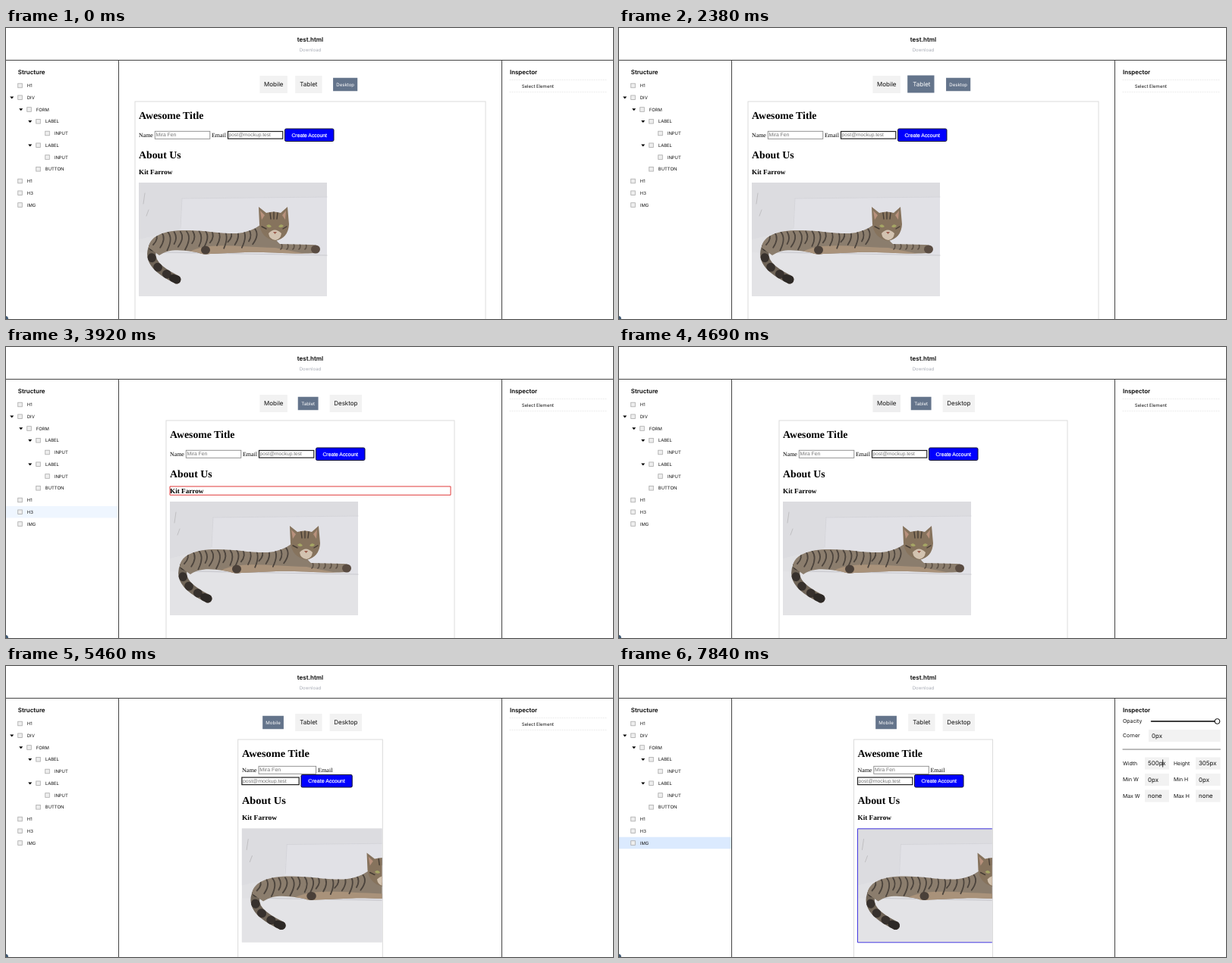
An HTML page that plays this animation: 800x384 px, repeating every 8000 ms.

```html
<!DOCTYPE html>
<html lang="en">
<head>
<meta charset="utf-8">
<title>Page editor</title>
<style>
  html, body { margin: 0; width: 100%; height: 100%; overflow: hidden; background: #fff; }
  svg { display: block; }
  text { font-family: Inter, sans-serif; text-rendering: geometricPrecision; white-space: pre; }
  .serif { font-family: "Liberation Serif", serif; }
  .arial { font-family: "Liberation Sans", sans-serif; }
  .bold { font-weight: 700; }
  .semi { font-weight: 600; }
  .mid { text-anchor: middle; }
  .strong { stroke: #fff; stroke-width: .2; }
</style>
</head>
<body>
<svg id="stage" width="800" height="384" viewBox="0 0 800 384"></svg>
<script>
const LOOP = 8000;
const WIDTHS = { desktop: 463, tablet: 381, mobile: 184 };
const TABLET_CLICK = 2675, MOBILE_CLICK = 5134, TAB_DELAY = 50, SELECT = 6510, UNHOVER = 7350, CARET = 7840;

const TREE = [['H1', 0], ['DIV', 0, 1], ['FORM', 1, 1], ['LABEL', 2, 1], ['INPUT', 3], ['LABEL', 2, 1],
  ['INPUT', 3], ['BUTTON', 2], ['H1', 0], ['H3', 0], ['IMG', 0]];
const IMG = 10;
// Hovered tree row from each time on; -1 means none
const HOVERS = [[0, -1], [3500, 7], [3640, IMG], [3920, 9], [4060, 8], [4130, 7], [4200, 5], [4270, 6],
  [4340, -1], [6300, 9], [6370, IMG], [UNHOVER, -1]];
// Outline boxes inside the page: x, y, width (0 = full), height
const BOXES = { 5: [101.5, 136, 94, 10.5], 6: [122.5, 136, 73, 10.5], 7: [197.5, 132.5, 65, 17.5],
  8: [5.5, 158, 0, 18], 9: [5.5, 184, 0, 11.3], 10: [5.5, 204.3, 248, 150] };

const text = (x, y, s, size, cls = '', fill = '#111') =>
  `<text x="${x}" y="${y + size * .35}" font-size="${size}" class="${cls}" fill="${fill}">${s}</text>`;
const rect = (x, y, w, h, fill, extra = '') =>
  `<rect x="${x}" y="${y}" width="${w}" height="${h}" fill="${fill}" ${extra}/>`;
const path = (d, fill, extra = '') => `<path d="${d}" fill="${fill}" ${extra}/>`;
const line = (d, color, w = 1, extra = '') =>
  path(d, 'none', `stroke="${color}" stroke-width="${w}" stroke-linecap="round" ${extra}`);
const rowY = i => 76 + 15.75 * i;

function treeRow([name, level, open], i) {
  const x = 18.5 + 12 * level, y = rowY(i);
  return rect(x - 2.8, y - 2.8, 5.6, 5.6, '#eee', 'stroke="#aaa" stroke-width=".8"') +
    text(x + 9.3, y, name, 5.9) +
    (open ? path(`M${x - 13.3} ${y - 1.2}h5l-2.5 3z`, '#000') : '');
}

function catPhoto() {
  const body = 'M13 86C14 72 30 64 56 63C85 62 105 68 130 67Q148 65 160 56C172 62 180 76 186 81L228 82' +
    'C239 81 241 92 232 93C205 95 165 91 140 92L94 94C82 96 82 92 70 91C52 88 38 88 27 96Z';
  let stripes = '';
  for (let i = 0; i < 17; i++) {
    const x = 22 + i * 8.2;
    stripes += line(`M${x} ${66 - i * .3}q${5 + i % 3} 8 ${-3 + i % 4} ${16 + i % 3 * 4}`, '#4c443d', 1.8);
  }
  for (let i = 0; i < 5; i++) stripes += line(`M${188 + i * 8} 80q2 6 -1 8`, '#5b4f44', 1.6);
  const tail = 'M19 84C10 104 28 117 50 128';
  return rect(0, 0, 248, 150, '#e0e0e3') +
    path('M0 0H248V19L57 21L54 62L0 75Z', '#dcdce0') +
    path('M57 21L248 19V96L110 93L54 62Z', '#e1e1e6') +
    path('M0 92L248 95V150H0Z', '#e3e3e6') +
    line('M57 21L248 19M57 21L55 60', '#d2d2d7', .8) +
    line('M30 92L248 96', '#c9c9cf', 1.2) +
    line('M8 14l-2 14M13 36l-3 8', '#c0bfc2') +
    line(tail, '#6f6457', 11) + line(tail, '#37312d', 11, 'stroke-dasharray="1 14" stroke-linecap="butt"') +
    line('M45 126l5 2', '#2d2926', 10) +
    path(body, '#8b7d6d') +
    `<clipPath id="fur"><path d="${body}"/></clipPath><g clip-path="url(#fur)">` +
    path('M62 94C85 78 120 84 180 86L240 98H62Z', '#a9927a') + stripes + '</g>' +
    path('M158 32L168 40Q178 37 187 40L196 32L198 55Q197 73 180 77Q161 73 159 55Z', '#86735d') +
    path('M160 37l6 6l-4 6zM194 37l-5 6l4 6z', '#b8917c') +
    line('M173 40l1 8M178 39v9M183 40l-1 8M162 58l6 3M195 58l-5 3', '#463d34', 1.4) +
    path('M171 67Q179 58 188 67Q187 75 180 76Q172 75 171 67Z', '#d3c3b0') +
    path('M168 57q4-4 7 1q-4 3-7-1zM191 57q-4-4-7 1q4 3 7-1z', '#a5a565') +
    path('M177 65h5l-2.5 3z', '#9b5c4c') +
    '<ellipse cx="88" cy="89" rx="6" ry="5.5" fill="#4a4039"/><ellipse cx="233" cy="88" rx="6" ry="5.5" fill="#5a4c42"/>';
}

const page = `<clipPath id="view">${rect(0, 97, 0, 300, '#000', 'id="viewRect"')}</clipPath>
  ${rect(.5, 97, 0, 300, '#fff', 'id="frame" stroke="#dcdcdc"')}
  <g clip-path="url(#view)">
    ${text(5.5, 115, 'Awesome Title', 13.8, 'serif bold', '#000')}
    <g id="lineOne">${text(5.5, 141, 'Name', 7.9, 'serif', '#000')}
      ${rect(26.8, 136.3, 72.5, 10, '#fff', 'stroke="#888" stroke-width=".9"')}
      ${text(28, 141, 'Mira Fen', 6.8, 'arial', '#757575')}
      ${text(101.5, 141, 'Email', 7.9, 'serif', '#000')}</g>
    <g id="lineTwo">${rect(123, 136.5, 72.3, 9.6, '#fff', 'stroke="#222" stroke-width="1.2"')}
      ${text(124, 141, 'post@mockup.test', 6.7, 'arial', '#757575')}
      ${rect(198, 133, 64.5, 16.5, '#00f', 'rx="1.8" stroke="#113"')}
      ${text(230.2, 141.2, 'Create Account', 6.8, 'arial mid strong', '#fff')}</g>
    <g id="below">${text(5.5, 167, 'About Us', 13.8, 'serif bold', '#000')}
      ${text(5.5, 189.5, 'Kit Farrow', 9.2, 'serif bold', '#000')}
      <g transform="translate(5.5 204)">${catPhoto()}</g></g>
    ${rect(0, 0, 0, 0, 'none', 'id="outline" vector-effect="non-scaling-stroke"')}
  </g>`;

const tabs = [['Mobile', 334.5, 36.5], ['Tablet', 381.2, 35.3], ['Desktop', 426.7, 42.3]].map(([name, x, w]) =>
  `<g class="tab">${rect(x, 63, w, 23, '#f2f2f2')}${text(x + w / 2, 74.5, name, 8, 'mid')}</g>`).join('');

const field = (label, value, labelX, x, w, y) =>
  text(labelX, y, label, 6.9) + rect(x, y - 8, w, 16, '#f2f2f2') + text(x + 4, y, value, 7.9);
const inspector = text(664, 73, 'Opacity', 6.9) + line('M701.5 73H788', '#000', 1.5) +
  '<circle cx="788.5" cy="73" r="3.4" fill="#fff" stroke="#000"/>' +
  field('Corner', '0px', 664, 698, 94.5, 92) + line('M664 110H792.5', '#555', .8) +
  [['Width', '500px', 'Height', '305px'], ['Min W', '0px', 'Min H', '0px'], ['Max W', 'none', 'Max H', 'none']]
    .map(([a, b, c, d], i) => field(a, b, 664, 693, 32, 128.5 + i * 21.5) +
      field(c, d, 731, 760, 32.5, 128.5 + i * 21.5)).join('') +
  rect(716.3, 123.5, .8, 10, '#000', 'id="caret"');

const $ = id => document.getElementById(id);
$('stage').innerHTML = rect(0, 0, 800, 384, '#fff') + rect(0, 0, 148, 15.5, '#eff6ff', 'id="rowBg"') +
  text(401, 15, 'test.html', 8, 'mid semi', '#000') + text(401, 28.5, 'Download', 6, 'mid', '#a8abb5') +
  line('M0 42.5H800M148.5 42.5V384M653.5 42.5V384', '#444') +
  text(15.8, 58.5, 'Structure', 7.9, 'semi', '#000') + text(664, 58.5, 'Inspector', 7.9, 'semi', '#000') +
  TREE.map(treeRow).join('') + tabs + `<g id="page">${page}</g>` +
  `<g id="empty">${line('M664 68.5H793M664 84.5H793', '#e6e6e6', .8, 'stroke-dasharray="1 2"')}
    ${text(679.7, 76.5, 'Select Element', 6)}</g><g id="inspector">${inspector}</g>` +
  '<circle cx="-1" cy="384" r="4" fill="#3f5a75"/>';

const clamp = v => Math.min(1, Math.max(0, v));
const ramp = (t, start, span = 200) => { const k = clamp((t - start) / span); return k * k * (3 - 2 * k); };
const mix = (a, b, k) => `rgb(${a.map((v, i) => Math.round(v + (b[i] - v) * k))})`;
const set = (el, attrs) => { for (const k in attrs) el.setAttribute(k, attrs[k]); };
const show = (id, on) => set($(id), { visibility: on ? 'visible' : 'hidden' });

// cubic-bezier(.4, 0, .1, 1)
function ease(x) {
  if (x <= 0 || x >= 1) return clamp(x);
  let lo = 0, hi = 1;
  for (let i = 0; i < 24; i++) {
    const s = (lo + hi) / 2, r = 1 - s;
    if (1.2 * r * r * s + .3 * r * s * s + s * s * s < x) lo = s; else hi = s;
  }
  return lo * lo * (3 - 2 * lo);
}

function drawTabs(t) {
  const toTablet = ramp(t, TABLET_CLICK + TAB_DELAY), toMobile = ramp(t, MOBILE_CLICK + TAB_DELAY);
  const dark = [ramp(t, 4670), ramp(t, 1870) - toMobile, 1 - toTablet];
  const active = [toMobile, toTablet - toMobile, 1 - toTablet];
  document.querySelectorAll('.tab').forEach((tab, i) => {
    const [bg, label] = tab.children, x = label.getAttribute('x'), y = 74.5;
    const lift = dark[i] - active[i];
    set(tab, { transform: `translate(${x - active[i] * .7} ${y}) scale(${1 - .24 * active[i]}) translate(${-x} ${-y})` });
    set(bg, { fill: mix([242, 242, 242], [100, 116, 139], dark[i]), transform: `translate(${-lift} ${-lift * .5})` });
    set(label, { fill: mix([17, 17, 17], [255, 255, 255], dark[i]) });
  });
}

function drawPage(t) {
  const mobile = t >= MOBILE_CLICK;
  const [from, to, start] = mobile ? [WIDTHS.tablet, WIDTHS.mobile, MOBILE_CLICK]
    : t >= TABLET_CLICK ? [WIDTHS.desktop, WIDTHS.tablet, TABLET_CLICK]
    : [WIDTHS.desktop, WIDTHS.desktop, 0];
  const shown = from + (to - from) * ease((t - start) / 450);
  set($('page'), { transform: `translate(${401 - shown / 2} 0) scale(${shown / to} 1)` });
  set($('frame'), { width: to - 1 });
  set($('viewRect'), { width: to - 1.2 });
  set($('lineOne'), { transform: `translate(0 ${mobile ? -4 : 0})` });
  set($('lineTwo'), { transform: mobile ? 'translate(-117.5 10.5)' : '' });
  set($('below'), { transform: `translate(0 ${mobile ? 10.5 : 0})` });

  const hover = HOVERS.findLast(([time]) => time <= t)[1];
  const row = hover < 0 && t >= SELECT ? IMG : hover;
  show('rowBg', row >= 0);
  show('outline', row >= 0);
  if (row < 0) return;
  const [x, y, w, h] = BOXES[row];
  set($('rowBg'), { y: rowY(row) - 7.8, fill: t >= SELECT ? '#dbeafe' : '#eff6ff' });
  set($('outline'), { x, y: y + (mobile ? 10.5 : 0), width: w || to - 11, height: h, stroke: hover < 0 ? '#4338e0' : '#e03a3a' });
}

function draw(now) {
  const t = now % LOOP;
  drawTabs(t);
  drawPage(t);
  show('empty', t < SELECT);
  show('inspector', t >= SELECT);
  show('caret', t >= CARET);
  requestAnimationFrame(draw);
}
draw(performance.now());
</script>
</body>
</html>
```
